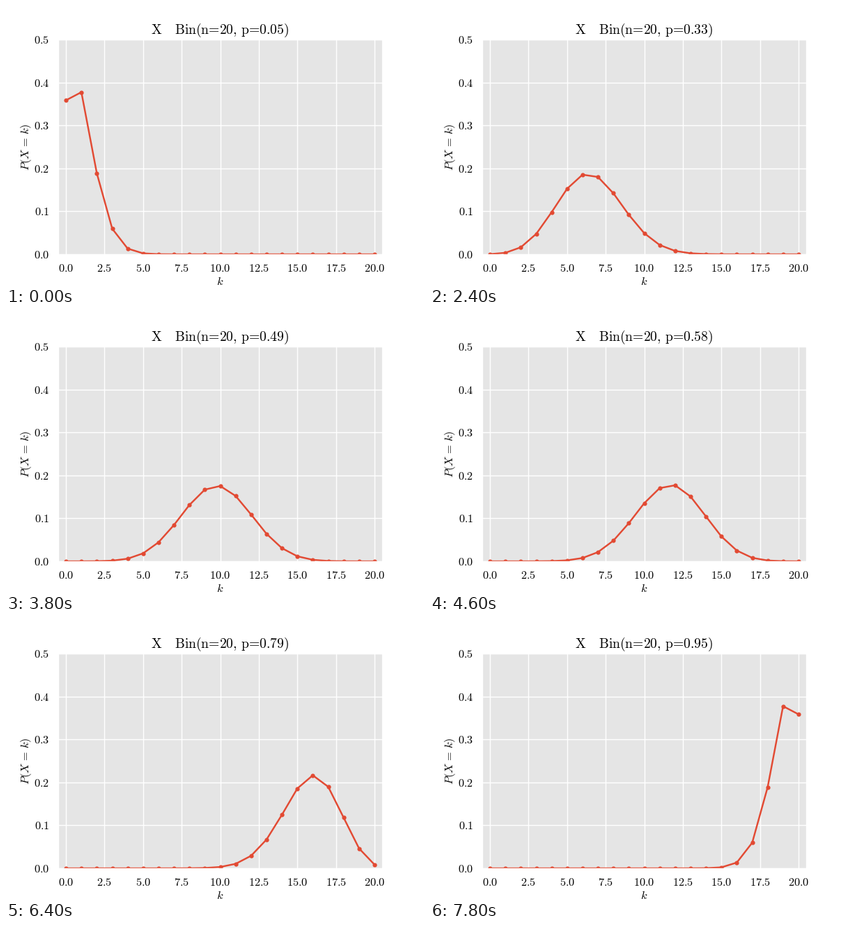
Write a matplotlib script that moves like this. It is 600 px wide and 400 px high and loops after 8 s.

```python
from math import comb

import matplotlib.pyplot as plt
import numpy as np
from matplotlib.animation import FuncAnimation

N = 20
FRAMES = 40
RED = "#E24A33"
SIZE = 11.75

plt.rcParams["mathtext.fontset"] = "cm"

k = np.arange(N + 1)
choose = np.array([comb(N, i) for i in k], dtype=float)
probs = np.linspace(0.05, 0.95, FRAMES)


def pmf(p):
    return choose * p**k * (1 - p) ** (N - k)


def title_text(p):
    # Upright text: cancel the math spacing around "=" and widen word gaps
    eq = r"\hspace{-0.2}=\hspace{-0.2}"
    return (
        rf"$\mathrm{{X\hspace{{1.139}}Bin(n{eq}{N},"
        rf"\hspace{{0.18}}p{eq}{p:.2f})}}$"
    )


def tick_text(value, _):
    return f"${value:.1f}$"


fig = plt.figure(figsize=(6, 4), dpi=100, facecolor="white")
ax = fig.add_axes([0.125, 0.11, 0.775, 0.77], facecolor="#E5E5E5")
ax.set(xlim=(-0.5, N + 0.5), ylim=(0, 0.5))
ax.set_xticks(np.arange(0, 20.1, 2.5))
ax.set_yticks(np.arange(0, 0.51, 0.1))
ax.set_axisbelow(True)
ax.grid(color="white", linewidth=1, linestyle="-")
for spine in ax.spines.values():
    spine.set(color="white", linewidth=1)
for axis, pad in ((ax.xaxis, 9.6), (ax.yaxis, 9.1)):
    axis.set_major_formatter(tick_text)
    axis.set_tick_params(length=0, pad=pad, labelsize=SIZE, labelcolor="black")

fig.text(307.5 / 600, 0.5 / 400, "$k$", size=SIZE, ha="center", va="baseline")
fig.text(
    33 / 600, 198 / 400, r"$P(X\hspace{0.116}=\hspace{0.116}k)$", size=SIZE,
    rotation=90, rotation_mode="anchor", ha="center", va="baseline",
)
title = ax.set_title(title_text(probs[0]), fontsize=14.1, pad=6, color="black")
(line,) = ax.plot(
    k, pmf(probs[0]), color=RED, linewidth=1.75,
    marker="o", markersize=4.5, markeredgewidth=0,
)


def update(i):
    p = probs[i]
    line.set_ydata(pmf(p))
    title.set_text(title_text(p))
    return line, title


anim = FuncAnimation(
    fig, update, frames=FRAMES, interval=200, repeat=True, repeat_delay=0, blit=False
)
plt.show()
```
